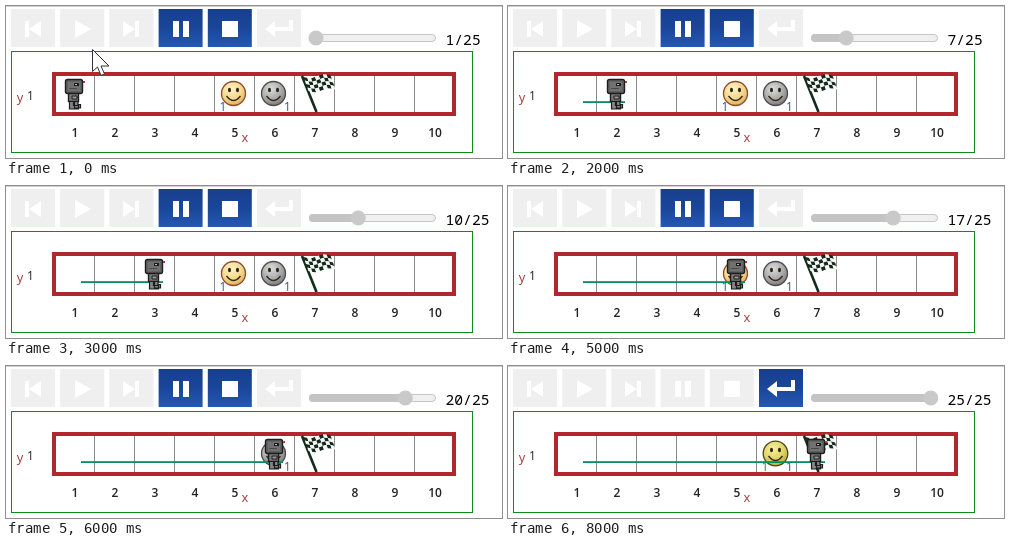
These frames come from a looping animation (496 px wide and 152 px high, 9 s). An HTML page:

```html
<!DOCTYPE html>
<html lang="en">
<head>
<meta charset="utf-8">
<title>Robot run</title>
<style>
  html, body { margin: 0; width: 100%; height: 100%; overflow: hidden; background: #fff; }
  svg { display: block; width: 496px; height: 152px; }
  .axis { font: 600 12px "Open Sans", "Noto Sans", sans-serif; fill: #222; text-anchor: middle; }
  .name { font: 13px "Open Sans", "Noto Sans", sans-serif; fill: #a33a3a; text-anchor: middle; }
  .tag { font: 12px "Open Sans", "Noto Sans", sans-serif; fill: #34508f; text-anchor: middle; }
  .count { font: 14.67px "Noto Sans Mono", "DejaVu Sans Mono", monospace; fill: #000; }
</style>
</head>
<body>
<svg id="stage" viewBox="0 0 496 152">
  <defs>
    <linearGradient id="blue" x2="0" y2="1">
      <stop offset="0" stop-color="#173f8c"/>
      <stop offset=".5" stop-color="#1a469a"/>
      <stop offset="1" stop-color="#2458b4"/>
    </linearGradient>
    <radialGradient id="peach" cx=".4" cy=".3" r=".75">
      <stop offset="0" stop-color="#fff3c4"/>
      <stop offset=".6" stop-color="#f3d78c"/>
      <stop offset="1" stop-color="#dfa954"/>
    </radialGradient>
    <radialGradient id="grey" cx=".4" cy=".3" r=".75">
      <stop offset="0" stop-color="#dcdcdc"/>
      <stop offset=".6" stop-color="#a8a8a8"/>
      <stop offset="1" stop-color="#767676"/>
    </radialGradient>
    <radialGradient id="yellow" cx=".4" cy=".3" r=".75">
      <stop offset="0" stop-color="#f6f0a0"/>
      <stop offset=".6" stop-color="#e0d263"/>
      <stop offset="1" stop-color="#b5a136"/>
    </radialGradient>
  </defs>
</svg>
<script>
const LOOP = 9000, STEP = 1000, TOTAL = 25;
// counter value and robot cell for each second
const steps = [[1, 1], [4, 1], [7, 2], [10, 3], [14, 4], [17, 5], [20, 6], [23, 6], [25, 7]];
const stage = document.getElementById("stage");

function add(tag, attrs, parent = stage, text) {
  const el = document.createElementNS("http://www.w3.org/2000/svg", tag);
  for (const key in attrs) el.setAttribute(key, attrs[key]);
  if (text !== undefined) el.textContent = text;
  parent.append(el);
  return el;
}
const rect = (x, y, width, height, fill, parent, more) =>
  add("rect", { x, y, width, height, fill, ...more }, parent);
const path = (d, attrs, parent) => add("path", { d, ...attrs }, parent);
const label = (x, y, text, cls, parent) => add("text", { x, y, class: cls }, parent, text);
const show = (el, on) => el.setAttribute("visibility", on ? "visible" : "hidden");
const cellX = n => 29 + 40 * n;

// toolbar
rect(0, 0, 496, 1, "#cfcfcf");
const icons = [
  "M19 15h4v16h-4zM35 15v16L23 23z",
  "M69 14v18l16-9z",
  "M117 15v16l12-8zM129 15h4v16h-4z",
  "M167 15h6v16h-6zM177 15h6v16h-6z",
  "M216 15h16v16h-16z",
  "M283 14h4v11h-18v6l-10-8l10-8v6h14z"
];
const buttons = icons.map((d, i) => {
  const back = rect(5 + 49.2 * i, 3, 44, 38, "#efefef");
  path(d, { fill: "#fff" });
  return back;
});

// slider
rect(303.5, 28.5, 126, 7, "#efefef", stage, { rx: 3.5, stroke: "#c6c6c6" });
const filled = rect(303, 28, 8, 8, "#c4c4c4", stage, { rx: 4 });
const thumb = add("circle", { cy: 32, r: 7.5, fill: "#c9c9c9" });
const count = label(439.5, 39, "", "count");

// board
rect(5.5, 45.5, 461, 101, "none", stage, { stroke: "#0f8a1c" });
for (let n = 1; n <= 10; n++) {
  if (n > 1) rect(cellX(n) - 21, 70, 1, 37, "#8c8c8c");
  label(cellX(n), 131, n, "axis");
}
rect(48, 68, 400, 40, "none", stage, { stroke: "#b0282e", "stroke-width": 4 });
label(14, 96, "y", "name");
label(24.5, 94, "1", "axis").style.fontWeight = 400;
label(239, 136, "x", "name");

// flag
path("M296 70L310.5 106", { stroke: "#122c1b", "stroke-width": 2.6, fill: "none" });
function flagPoint(u, v) {
  const wave = 1.6 * Math.sin(u * 6.3);
  return `${297.5 + 27 * u + 5 * v} ${71 - u * 1.5 + wave + 14 * v}`;
}
for (let col = 0; col < 7; col++) {
  for (let row = 0; row < 4; row++) {
    const [a, b, c, d] = [col / 7, (col + 1) / 7, row / 4, (row + 1) / 4];
    path(`M${flagPoint(a, c)}L${flagPoint(b, c)}L${flagPoint(b, d)}L${flagPoint(a, d)}z`,
      { fill: (col + row) % 2 ? "#f4f7f4" : "#17291d" });
  }
}

function face(cx, fill, edge, r) {
  const g = add("g", { transform: `translate(${cx} 87.5)` });
  add("circle", { r, fill: `url(#${fill})`, stroke: edge, "stroke-width": 1.3 }, g);
  for (const x of [-4, 4]) add("ellipse", { cx: x, cy: -3.5, rx: 1.5, ry: 2.2, fill: "#2c2416" }, g);
  path("M-7 2.5Q0 11.5 7 2.5", { fill: "none", stroke: "#3a2a18", "stroke-width": 1.3 }, g);
  return g;
}
const peach = face(227.5, "peach", "#8f4a2c", 12);
const grey = face(267.5, "grey", "#4c4c4c", 12);
const yellow = face(267.5, "yellow", "#4d4618", 12.3);
const tagFive = label(217, 105, "1", "tag");
const tagPut = label(257, 105, "1", "tag");
tagPut.style.fill = "#158a4a";
label(281.5, 105, "1", "tag");

const trail = rect(75, 95.2, 0, 1.8, "#07905c");

// robot
const robot = add("g", {});
const ink = "#1d1d1d";
rect(-9.5, 73.5, 17, 14, "#626262", robot, { stroke: ink, "stroke-width": 1.4, rx: 2 });
rect(-7, 76, 12, 9, "#707070", robot);
rect(-1, 77, 5, 3, ink, robot);
rect(0, 78, 2, 1, "#b8b8b8", robot);
rect(-6, 82, 8, 1, "#4a4a4a", robot);
rect(7, 76, 2, 1, ink, robot);
rect(8, 75, 2, 2, "#d8283a", robot);
rect(-6.5, 87.5, 10, 8, "#777", robot, { stroke: ink, "stroke-width": 1.4 });
path("M-3 90h5v3h-5z", { fill: "#9a9a9a", stroke: ink }, robot);
path("M-5.5 95.5h4v4h5v3.5h-9zM-.5 95.5h3.5v3h2.5v3.5h-6z",
  { fill: "#858585", stroke: ink, "stroke-width": 1.2 }, robot);

const cursor = path("M86.5 43.5V65.5L91.5 61L95 69.5L98.5 68L95 60H103z",
  { fill: "#fff", stroke: "#333", "stroke-width": 1 });

function draw(time) {
  const i = Math.floor((time % LOOP) / STEP);
  const [value, cell] = steps[i];
  const last = value === TOTAL;
  const x = 310 + 112.8 * (value - 1) / (TOTAL - 1);
  thumb.setAttribute("cx", x);
  filled.setAttribute("width", x - 303);
  count.textContent = `${value}/${TOTAL}`;
  buttons.forEach((b, n) => {
    const on = last ? n === 5 : n === 3 || n === 4;
    b.setAttribute("fill", on ? "url(#blue)" : "#efefef");
  });
  robot.setAttribute("transform", `translate(${cellX(cell)} 0)`);
  trail.setAttribute("width", cell > 1 ? cellX(cell) + 8 - 75 : 0);
  show(cursor, i === 0);
  show(peach, i < 6);
  show(tagFive, i < 6);
  show(grey, i < 7);
  show(yellow, i > 6);
  show(tagPut, i > 6);
}

const start = performance.now();
function tick() {
  draw(performance.now() - start);
  requestAnimationFrame(tick);
}
tick();
</script>
</body>
</html>
```
